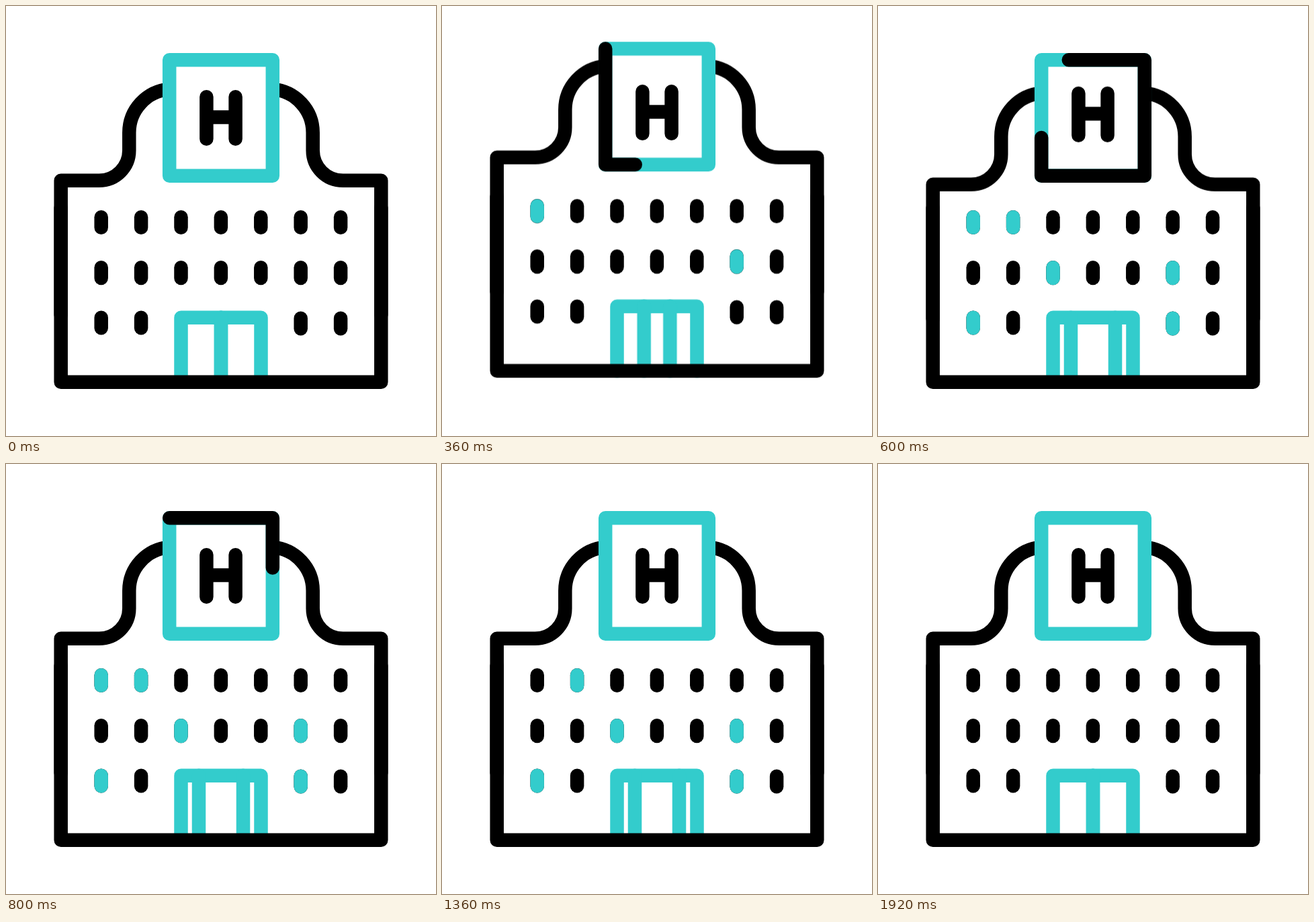
Write an HTML page that moves like this. It is 640 px wide and 640 px high and loops after 2 s.

```html
<!DOCTYPE html>
<html lang="en">
<head>
<meta charset="utf-8">
<title>Hospital</title>
<style>
  @property --from { syntax: "<number>"; inherits: false; initial-value: 0; }
  @property --to { syntax: "<number>"; inherits: false; initial-value: 0; }

  html, body { margin: 0; width: 100%; height: 100%; overflow: hidden; background: #fff; }
  svg {
    display: block; width: 100%; height: 100%;
    fill: none; stroke: #000; stroke-width: 20.5;
    stroke-linecap: round; stroke-linejoin: round;
  }
  .teal { stroke: #33cccc; }
  .panel { fill: #fff; }

  .building, .roof, .letter, .door {
    animation: 2s cubic-bezier(.3333, 0, .6667, 1) infinite;
  }
  .building { animation-name: hop; }
  .roof { animation-name: stretch; }
  .letter { animation-name: bob; }
  .door { animation-name: slide; }
  .left { --gap: -33px; }
  .right { --gap: 33px; }

  /* A stroke that runs around the sign and then clears behind itself */
  .tracer {
    stroke-dasharray: calc((var(--to) - var(--from)) * 1px) 1400px;
    stroke-dashoffset: calc(var(--from) * -1px);
    animation: head 2s cubic-bezier(.3333, 0, .6667, 1) infinite,
               tail 2s cubic-bezier(.3333, 0, .6667, 1) infinite,
               show 2s step-end infinite;
  }
  .lit { opacity: 0; animation: light 2s step-end infinite; }

  @keyframes hop {
    0%, 8%, 24%, 100% { transform: translateY(0); }
    18% { transform: translateY(-16.7px); }
  }
  @keyframes stretch {
    0%, 8%, 36%, 100% { transform: translateY(0); }
    16% { transform: translateY(-19.8px); }
    28% { transform: translateY(6.9px); }
  }
  @keyframes bob {
    0%, 8%, 36%, 100% { transform: translateY(0); }
    22% { transform: translateY(10.8px); }
    30% { transform: translateY(-5.2px); }
  }
  @keyframes slide {
    0%, 8%, 96%, 100% { transform: translateX(0); }
    26%, 72% { transform: translateX(var(--gap)); }
  }
  @keyframes head {
    0%, 8% { --to: 0; }
    34%, 100% { --to: 652.2; }
  }
  @keyframes tail {
    0%, 22% { --from: 0; }
    52%, 100% { --from: 652.2; }
  }
  @keyframes show {
    0%, 52%, 100% { opacity: 0; }
    8.1% { opacity: 1; }
  }
  @keyframes light {
    0%, 68%, 100% { opacity: 0; }
    16% { opacity: 1; }
  }
</style>
</head>
<body>
<svg viewBox="0 0 640 640">
  <g class="building">
    <g class="teal">
      <path d="M260.5 559.8V463.7H379.5V559.8"/>
      <path class="door left" d="M320 463.7V559.8"/>
      <path class="door right" d="M320 463.7V559.8"/>
    </g>
    <!-- Roof and base walls overlap so the height can change -->
    <path class="roof" d="M81.7 460V259.8H138.5A44.8 44.8 0 0 0 183.3 215V188.5A64.8 64.8 0 0 1 243.2 123.9
      M396.8 123.9A64.8 64.8 0 0 1 456.7 188.5V215A44.8 44.8 0 0 0 501.5 259.8H558.3V460"/>
    <path d="M81.7 300V559.8H558.3V300"/>
    <g id="windows"></g>
    <path class="teal panel" d="M243.2 80.2V252.7H396.8V80.2Z"/>
    <path class="tracer" d="M243.2 80.2V252.7H396.8V80.2H243.2"/>
    <path class="letter" d="M298.4 135.3V197.7M341.6 135.3V197.7M298.4 165.5H341.6"/>
  </g>
</svg>
<script>
  const windows = document.getElementById('windows');
  const rowTops = [314.2, 389.3, 463.7];
  const litOrder = ['0,0', '1,5', '2,0', '2,5', '0,1', '1,2'];

  function addPane(d, className) {
    const pane = document.createElementNS('http://www.w3.org/2000/svg', 'path');
    pane.setAttribute('d', d);
    pane.setAttribute('class', className);
    windows.append(pane);
    return pane;
  }

  rowTops.forEach((top, row) => {
    for (let col = 0; col < 7; col++) {
      if (row === 2 && col > 1 && col < 5) continue;
      const y = row === 2 && col > 4 ? top + 1 : top;
      const d = `M${141.7 + col * 59.4} ${y}v15.6`;
      addPane(d, 'pane');
      const turn = litOrder.indexOf(`${row},${col}`);
      if (turn >= 0) addPane(d, 'teal lit').style.animationDelay = `${turn * 40}ms`;
    }
  });
</script>
</body>
</html>
```
